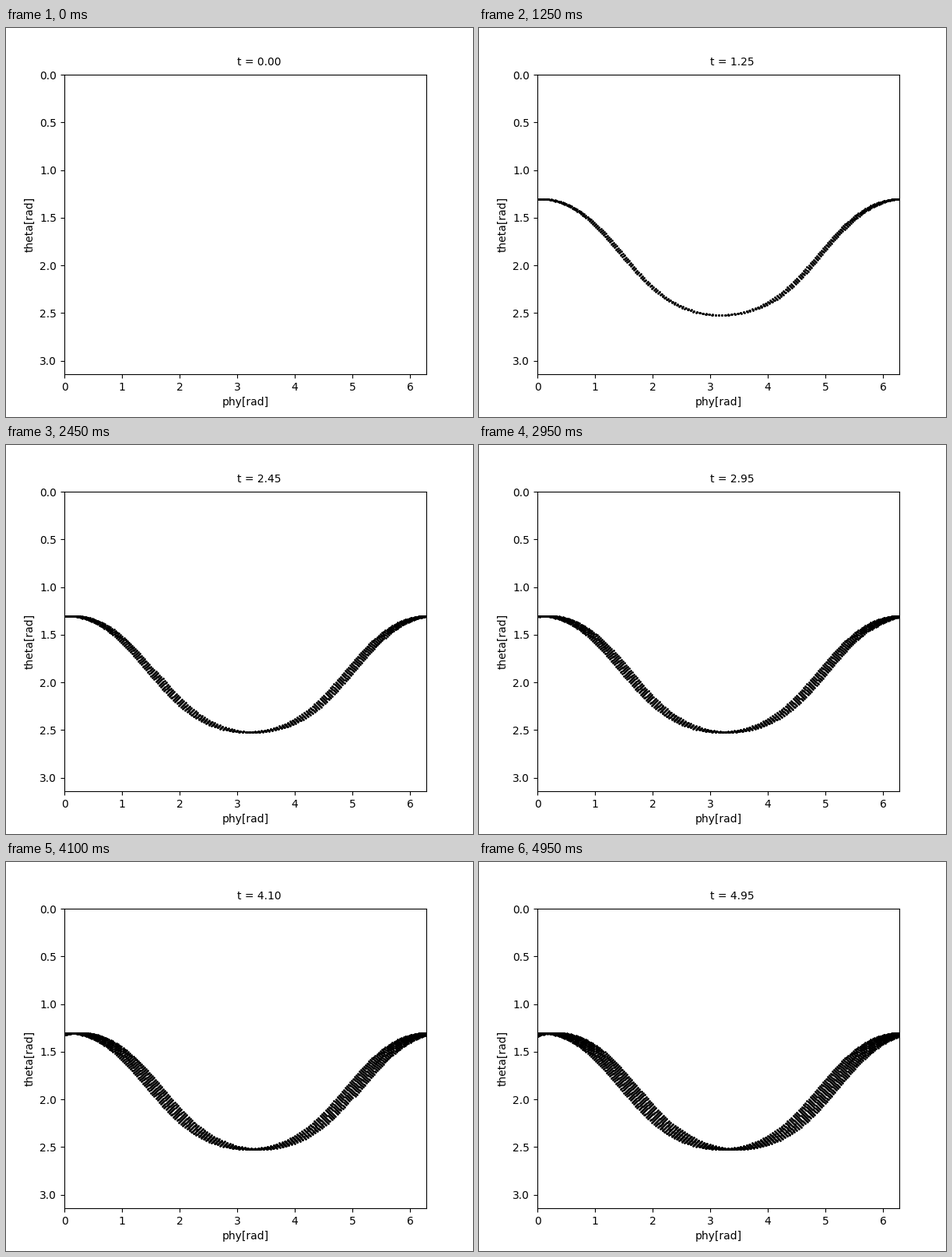
A matplotlib script that plays this animation: 600 px wide and 500 px high, repeating every 5000 ms.

```python
import numpy as np
import matplotlib.pyplot as plt
from matplotlib.animation import FuncAnimation

FRAMES = 100
INTERVAL = 50          # ms
POINTS_PER_FRAME = 25
TILT = 0.61            # angle between the cone axis and the -z direction
RADIUS = 1.23          # half-angle of the cone
SPIN = 17.3            # rad/s around the cone axis
DRIFT = 0.074          # rad/s of the axis around z


def track(t):
    """Spherical angles (phi, theta) of a vector circling a drifting axis."""
    psi = SPIN * t
    u = np.sin(RADIUS) * np.cos(psi)
    y = -np.sin(RADIUS) * np.sin(psi)
    w = np.cos(RADIUS)
    x = u * np.cos(TILT) + w * np.sin(TILT)
    z = u * np.sin(TILT) - w * np.cos(TILT)
    phi = (np.arctan2(y, x) + DRIFT * t) % (2 * np.pi)
    return np.column_stack([phi, np.arccos(z)])


step = INTERVAL / 1000 / POINTS_PER_FRAME
points = track(step * np.arange(FRAMES * POINTS_PER_FRAME))

fig, ax = plt.subplots(figsize=(6, 5), dpi=100)
ax.set_xlim(0, 2 * np.pi)
ax.set_ylim(np.pi, 0)
ax.set_xlabel("phy[rad]")
ax.set_ylabel("theta[rad]")
dots = ax.scatter([], [], s=1, c="black")
clock = ax.text(3, -0.1, "t = 0.00")


def update(frame):
    dots.set_offsets(points[:frame * POINTS_PER_FRAME])
    clock.set_text(f"t = {frame * INTERVAL / 1000:.2f}")
    return dots, clock


anim = FuncAnimation(fig, update, frames=FRAMES, interval=INTERVAL,
                     repeat=True, repeat_delay=0)
plt.show()
```
